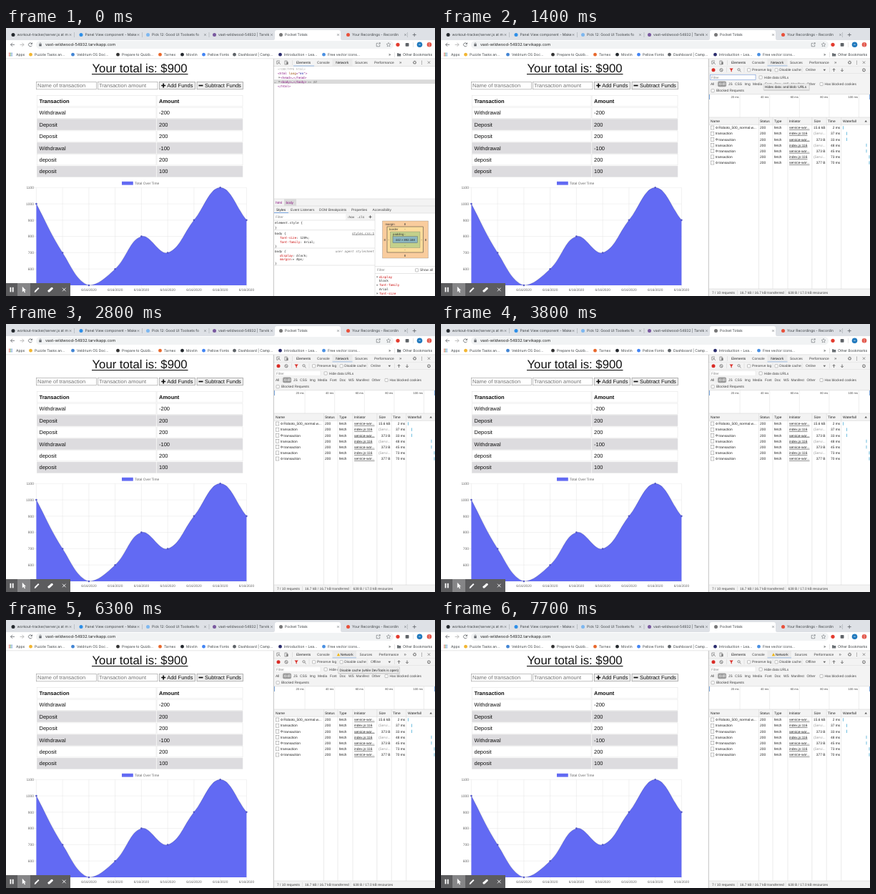
Write an HTML page that moves like this. It is 600 by 375 pixels and loops after 8 s.

```html
<!DOCTYPE html>
<html lang="en">
<head>
<meta charset="utf-8">
<title>Savings page with developer tools</title>
<style>
html, body { margin: 0; width: 100%; height: 100%; overflow: hidden; background: #fff; }
svg { display: block; width: 100%; height: 100%; }
text { font-family: "Liberation Sans", Arial, sans-serif; text-rendering: geometricPrecision; white-space: pre; }
.ui { font-family: Inter, Roboto, sans-serif; }
.mono { font-family: "DejaVu Sans Mono", monospace; }
.link { text-decoration: underline .35px #777; }
</style>
</head>
<body>
<svg id="stage" viewBox="0 0 600 375"></svg>
<script>
const LOOP = 8000;
const escapeText = s => s.replace(/&/g, '&amp;').replace(/</g, '&lt;');
const rect = (x, y, w, h, fill, extra = '') =>
  `<rect x="${x}" y="${y}" width="${w}" height="${h}" fill="${fill}" ${extra}/>`;
const line = (x1, y1, x2, y2, color = '#ccc', width = .5) =>
  `<path d="M${x1} ${y1}L${x2} ${y2}" stroke="${color}" stroke-width="${width}"/>`;
const path = (d, color = '#5f6368', width = .8, fill = 'none') =>
  `<path d="${d}" stroke="${color}" stroke-width="${width}" fill="${fill}"/>`;
const dot = (x, y, r, fill, extra = '') => `<circle cx="${x}" cy="${y}" r="${r}" fill="${fill}" ${extra}/>`;
// Text is placed by its vertical centre.
const text = (x, y, s, size = 4.85, fill = '#444', extra = '') =>
  `<text x="${x}" y="${y + size * .35}" font-size="${size}" fill="${fill}" ${extra}>${escapeText(s)}</text>`;
const ui = (x, y, s, size = 5, fill = '#3c4043') => text(x, y, s, size, fill, 'class="ui"');
const mono = (x, y, s, fill = '#222', extra = '') => text(x, y, s, 4.3, fill, 'class="mono" ' + extra);
const group = (id, body) => `<g id="${id}">${body}</g>`;
const cross = (x, y, r = 1.5, color = '#5f6368', width = .6) =>
  path(`M${x - r} ${y - r}l${2 * r} ${2 * r}m0 ${-2 * r}l${-2 * r} ${2 * r}`, color, width);
const gear = (x, y) => dot(x, y, 1.8, 'none', 'stroke="#666" stroke-width="1.2" stroke-dasharray="1.1 .3"');
const checkbox = (x, y) => rect(x, y - 2.1, 4.2, 4.2, '#fff', 'rx=".6" stroke="#888" stroke-width=".5"');
const END = 'text-anchor="end"', MIDDLE = 'text-anchor="middle"', BOLD = 'font-weight="bold"';

function browser() {
  const tabs = [
    [15.5, 'workout-tracker/server.js at m', '#24292e'],
    [110.5, 'Panel View component - Make', '#2d8fe8'],
    [204, 'Pick 12: Good UI Toolsets fo', '#7db7f0'],
    [297, 'vast-wildwood-54932 | Tarvik', '#79589f'],
    [390, 'Pocket Totals', '#777'],
    [484, 'Your Recordings - Recordin', '#e8503a']];
  let out = rect(0, 0, 600, 17, '#dee1e6') + path('M374 17Q376 17 376 14V6Q376 3 379 3H465Q468 3 468 6V14Q468 17 470 17Z', 'none', 0, '#fff');
  tabs.forEach(([x, label, color], i) => {
    out += `<clipPath id="tab${i}"><rect x="${x}" y="0" width="72" height="17"/></clipPath>` +
      `<g clip-path="url(#tab${i})">${ui(x, 9.5, label)}</g>` + dot(x - 5.5, 9.5, 2.5, color) + cross(x + 74.5, 9.5, 1.3);
    if (i < 3) out += line(x + 80, 6, x + 80, 13, '#9aa0a6');
  });
  out += line(561.5, 6, 561.5, 13, '#9aa0a6') + path('M568.7 9.5h5M571.2 7v5');

  out += rect(0, 17, 600, 26, '#fff') + rect(42, 18, 500, 11, '#f1f3f4', 'rx="5.5"') +
    path('M12 23.3H6.5M9 20.8L6.5 23.3L9 25.8') + path('M19.5 23.3H25M22.5 20.8L25 23.3L22.5 25.8', '#aaa') +
    path('M36 21.8A2.5 2.5 0 1 0 36.3 24.4M36.5 20.5v2h-2') +
    rect(46.3, 22.6, 3.4, 2.8, '#5f6368') + path('M47 22.8V21.8a1 1 0 0 1 2 0V22.8', '#5f6368', .6) +
    ui(55, 23.3, 'vast-wildwood-54932.tarvikapp.com', 5.6, '#222') +
    path('M520.5 21.3H518.2V25.8H522.7V23.5M521 23L523.2 20.8M521.5 20.8h1.7v1.7', '#5f6368', .6) +
    path('M535 20.4l.9 1.9 2 .2-1.5 1.4.4 2-1.8-1-1.8 1 .4-2-1.5-1.4 2-.2Z', '#5f6368', .5) +
    dot(548, 23.3, 2.6, '#e33b2e') + rect(558.7, 20.9, 4.8, 4.8, '#5f6368', 'rx=".8"') + line(569.5, 20, 569.5, 27) +
    dot(578.5, 23.3, 3.8, '#2079bd') + text(578.5, 23.3, 'av', 3, '#fff', MIDDLE) +
    dot(592, 23.3, 3.3, '#e2584c') + [21.6, 23.3, 25].map(y => dot(592, y, .5, '#fff')).join('');

  for (let i = 0; i < 9; i++) out += rect(4 + i % 3 * 1.8, 34.6 + (i / 3 | 0) * 1.8, 1.2, 1.2, ['#e0574a', '#5b9c63', '#4b83d8'][i % 3]);
  out += ui(14, 37.2, 'Apps');
  [[40, 'Puzzle Tasks an...', '#f2b632'], [99, 'Veldrium OS Doc...', '#4285d4'], [162, 'Prepare to Quizb...', '#333'],
   [221, 'Tarnex', '#e8682c'], [252, 'Movlin', '#24292e'], [282, 'Pellow Fonts', '#4285f4'],
   [325, 'Dashboard | Camp...', '#5f6368'], [389, 'Introduction - Lea...', '#2b2d6e'], [450, 'Free vector icons...', '#4a90e2']]
    .forEach(([x, label, color]) => out += dot(x - 5.5, 37.2, 2.4, color) + ui(x, 37.2, label));
  return out + ui(535, 37, '»', 5.5) + line(543.5, 34, 543.5, 41) +
    path('M547 35.3h2l.7.8h2.6v3.4H547Z', 'none', 0, '#6b7075') + ui(555, 37.2, 'Other Bookmarks') + line(0, 42.8, 600, 42.8);
}

function page() {
  const box = (x, w, fill, stroke) => rect(x, 75.5, w, 10.3, fill, `stroke="${stroke}" stroke-width=".6"`);
  let out = text(187, 56, 'Your total is: $900', 16.7, '#111', MIDDLE) + rect(120, 64, 134.5, 1.1, '#111') +
    box(42.5, 84, '#fff', '#999') + text(44, 80.8, 'Name of transaction', 7.5, '#757575') +
    box(128.5, 83.5, '#fff', '#999') + text(130, 80.8, 'Transaction amount', 7.5, '#757575') +
    box(214.5, 50, '#efefef', '#888') + path('M217.2 80.5h6M220.2 77.5v6', '#111', 1.7) + text(225.2, 80.8, 'Add Funds', 7.5, '#111') +
    box(267, 64.5, '#efefef', '#888') + path('M269.5 80.5h6', '#111', 1.7) + text(278, 80.8, 'Subtract Funds', 7.5, '#111');
  [['Transaction', 'Amount'], ['Withdrawal', '-200'], ['Deposit', '200'], ['Deposit', '200'],
   ['Withdrawal', '-100'], ['deposit', '200'], ['deposit', '100']].forEach((cells, i) => {
    const y = 102.3 + i * 16.4, shaded = i && i % 2 == 0;
    cells.forEach((cell, j) => out += rect(j ? 211 : 43.2, y - 7.6, j ? 120 : 166.8, 15.2, shaded ? '#dddcdf' : '#fff',
      'stroke="#e0e0e0" stroke-width=".5"') + text(j ? 214 : 46.5, y, cell, 7.5, '#111', i ? '' : BOLD));
  });
  return out + chart();
}

function chart() {
  const left = 42.4, right = 336.4, top = 223.3, bottom = 360, step = (right - left) / 8;
  const toY = v => bottom - (v - 500) / 600 * (bottom - top);
  const clampY = y => Math.max(top, Math.min(bottom, y));
  const points = [1000, 700, 500, 600, 800, 700, 900, 1100, 900].map((v, i) => [left + i * step, toY(v)]);
  const controls = points.map((p, i) => {
    const a = points[i - 1] || p, b = points[i + 1] || p;
    const before = Math.hypot(p[0] - a[0], p[1] - a[1]), after = Math.hypot(b[0] - p[0], b[1] - p[1]);
    const at = k => [p[0] + k * (b[0] - a[0]), clampY(p[1] + k * (b[1] - a[1]))];
    return { into: at(-.4 * before / (before + after)), out: at(.4 * after / (before + after)) };
  });
  const curve = 'M' + points[0] + points.slice(1).map((p, i) => `C${controls[i].out} ${controls[i + 1].into} ${p}`).join('');
  let out = rect(162, 214.8, 15.8, 4.8, '#626af3') + text(180, 217.3, 'Total Over Time', 4.9, '#666');
  for (let v = 500; v <= 1100; v += 100) {
    out += line(left - 4, toY(v), right, toY(v), '#e4e4e4');
    if (v > 500) out += text(39, toY(v), String(v), 4.9, '#666', END);
  }
  points.forEach(([x], i) => out += line(x, top, x, bottom + 4, '#e4e4e4') +
    (i > 1 ? text(x, 366.3, '6/16/2020', 4.8, '#666', MIDDLE) : ''));
  return out + path(`${curve}L${right} ${bottom}H${left}Z`, 'none', 0, '#626af3') + path(curve, 'rgba(0,0,0,.1)', 1.2) +
    points.map(([x, y]) => dot(x, y, 1.3, '#5257c8')).join('');
}

function recorder() {
  return rect(0, 357, 90, 18, '#5c5c5e') + rect(16, 357, 18, 18, '#858587') +
    rect(5.5, 362.8, 1.8, 6.6, '#fff') + rect(8.8, 362.8, 1.8, 6.6, '#fff') +
    path('M22.8 361.7V369.4L24.6 367.7L25.9 370.4L27.1 369.8L25.8 367.2H28Z', 'none', 0, '#fff') +
    path('M40.7 368.8L45.8 363.6', '#fff', 2) + path('M39.6 370l.5-2 1.5 1.5Z', 'none', 0, '#fff') +
    path('M58.2 367.6L63.3 363.2Q64 362.6 65 363L66 364.7L61 369.4H59Z', 'none', 0, '#fff') + cross(81.3, 366, 2.3, '#fff', .9);
}

function toolsFrame() {
  return rect(374, 43, 226, 332, '#fff') + rect(374, 43, 226, 10.5, '#f3f3f3') +
    path('M383 46H378.8V50.3H380.5M381 48l3 3M381 50v-2h2', '#666', .6) +
    rect(390, 46, 3, 5, 'none', 'stroke="#666" stroke-width=".6"') + rect(392.3, 47.4, 2.3, 3.6, '#777') +
    line(400.5, 45, 400.5, 52) +
    group('elementsTab', rect(402, 52.7, 29, .8, '#5b97e5')) +
    rect(456.5, 43.3, 28, 9.8, '#eaeaea') + group('warnTab', rect(484, 43.3, 6, 9.8, '#eaeaea') +
      path('M465 46.2L467.2 50.2H462.8Z', 'none', 0, '#f0b400')) +
    group('networkLine', rect(456.5, 52.7, 28, .8, '#5b97e5')) +
    text(406, 48.3, 'Elements', 4.85, '#222') + text(435, 48.3, 'Console') +
    group('laterTabs', text(461.3, 48.3, 'Network', 4.85, '#222') + text(488, 48.3, 'Sources') + text(515, 48.3, 'Performance') + text(550, 48, '»', 6)) +
    gear(571.5, 48.2) + [46.2, 48.2, 50.2].map(y => dot(581.5, y, .55, '#666')).join('') + cross(591.5, 48.2, 1.7, '#555') +
    line(374, 53.5, 600, 53.5) + line(374.3, 43, 374.3, 375, '#aaa', .7);
}

function elementsPanel() {
  const tag = '#881280', red = '#c80000';
  const arrow = (x, y, c = '#777') => path(`M${x} ${y - 1.3}v2.6l2-1.3Z`, 'none', 0, c);
  let out = rect(375, 72.2, 225, 5.8, '#dadada') + mono(380, 57.8, '<!DOCTYPE html>', '#aaa') +
    `<text class="mono" x="380" y="65" font-size="4.3" fill="${tag}">&lt;html <tspan fill="#994500">lang</tspan>="<tspan fill="#1a1aa6">en</tspan>"&gt;</text>` +
    arrow(381.5, 69.3) + mono(384, 69.3, '<head>…</head>', tag) + mono(375, 75, '…', '#777') + arrow(381.5, 75) +
    mono(384, 75, '<body>…</body>', tag) + mono(422, 75, '== $0', '#777', 'font-style="italic"') + mono(380, 81, '</html>', tag);
  out += rect(375, 239, 225, 20, '#f3f3f3') + line(375, 239, 600, 239) + line(375, 249, 600, 249) +
    text(377, 244, 'html', 4.85, tag) + rect(389, 239.3, 17, 9.5, '#dadada') + text(391.5, 244, 'body', 4.85, tag) +
    text(378, 254, 'Styles', 4.85, '#222') + text(398, 254, 'Event Listeners') + text(438, 254, 'DOM Breakpoints') +
    text(483, 254, 'Properties') + text(512.5, 254, 'Accessibility') + rect(375, 258, 20, 1, '#5b97e5') + line(375, 259, 600, 259) +
    text(377, 264.5, 'Filter', 4.85, '#888') + rect(475, 259.5, 41, 9.3, '#f3f3f3') + mono(477, 264.3, ':hov', '#333') +
    mono(491, 264.3, '.cls', '#333') + path('M507.5 264.3h4M509.5 262.3v4', '#444') + line(375, 269, 516, 269) + line(516, 259, 516, 375);
  out += mono(376, 272.5, 'element.style {') + mono(376, 279, '}') + line(375, 282.7, 516, 282.7) +
    mono(376, 287, 'body {') + text(515, 287, 'styles.css:1', 4.3, '#555', END + ' class="mono link"') + mono(376, 305, '}') +
    line(375, 308, 516, 308) + mono(376, 312.3, 'body {', '#222', 'font-style="italic"') +
    mono(515, 312.3, 'user agent stylesheet', '#777', END + ' font-style="italic"') + mono(376, 329, '}') + line(375, 332, 516, 332);
  [[293, 'font-size', ' 120%;'], [299, 'font-family', ' Arial;'], [318, 'display', ' block;'], [323.7, 'margin', '▸ 8px;']]
    .forEach(([y, key, value]) => out += `<text class="mono" x="383" y="${y + 1.5}" font-size="4.3" fill="#222" ${y > 310 ? 'font-style="italic"' : ''}><tspan fill="${red}">${key}</tspan>:${value}</text>`);
  out += rect(526.5, 270, 64, 52, '#f9cc9d', 'stroke="#555" stroke-width=".5" stroke-dasharray="1"') +
    rect(533, 278, 50.5, 36, '#fddd9b', 'stroke="#333" stroke-width=".5"') +
    rect(537.5, 285, 41.5, 22.5, '#c3d08b', 'stroke="#555" stroke-width=".5" stroke-dasharray="1"') +
    rect(541, 291.8, 34.5, 9, '#8cb6c0', 'stroke="#555" stroke-width=".4"') +
    text(558.3, 296.3, '442 × 892.188', 4.2, '#222', MIDDLE) + text(530.5, 274, 'margin', 4.3, '#333') +
    text(536, 281.7, 'border', 4.3, '#333') + text(541, 288.5, 'padding', 4.3, '#333') +
    [[529.8, 296], [587, 296], [558, 274], [558, 318]].map(([x, y]) => text(x, y, '8', 4.3, '#333', MIDDLE)).join('') +
    [[535.3, 296], [581.3, 296], [558, 281.7], [558, 288.5], [558, 304], [558, 310.5]].map(([x, y]) => text(x, y, '-', 4.3, '#333', MIDDLE)).join('');
  out += line(516, 333.5, 600, 333.5) + text(519, 338.8, 'Filter', 4.85, '#888') + checkbox(572.5, 338.8) + text(579, 338.8, 'Show all') + line(516, 343.5, 600, 343.5);
  [['display', 'block'], ['font-family', 'Arial'], ['font-size', '']].forEach(([key, value], i) => {
    const y = 348.2 + i * 11.6;
    out += arrow(518.5, y) + mono(522, y, key, red) + mono(522, y + 5.4, value);
  });
  return out;
}

function networkPanel() {
  const bottom = 365;
  let out = rect(375, 53.7, 225, 72, '#f3f3f3') + line(375, 63.5, 600, 63.5, '#ddd') +
    dot(381, 58.8, 2.5, '#d92b25') + dot(392, 58.8, 2.1, 'none', 'stroke="#666" stroke-width=".8"') + line(390.6, 57.4, 393.4, 60.2, '#666', .7) +
    line(399.5, 55, 399.5, 62) + path('M403.5 56.5h5.2l-2 2.5v2.6l-1.2-.8V59Z', 'none', 0, '#d92b25') +
    dot(416.5, 58.2, 1.6, 'none', 'stroke="#666" stroke-width=".7"') + line(417.7, 59.4, 419.5, 61.2, '#666', .8) + line(424, 55, 424, 62) +
    checkbox(428.5, 58.8) + text(435, 58.8, 'Preserve log') + line(464, 55, 464, 62) + checkbox(467, 58.8) + text(473.3, 58.8, 'Disable cache') + line(505, 55, 505, 62) +
    group('online', text(510, 58.8, 'Online')) + group('offline', text(510, 58.8, 'Offline')) +
    path('M534.5 57.8h3.6l-1.8 2.5Z', 'none', 0, '#666') + line(543.5, 55, 543.5, 62) +
    path('M549.5 61V57M547.7 58.7l1.8-1.9 1.8 1.9', '#666', .9) + path('M561 56.6V60.6M559.2 58.9l1.8 1.9 1.8-1.9', '#666', .9) +
    gear(591.5, 58.8) +
    rect(376.5, 65.3, 63.5, 7.4, '#fff', 'stroke="#ddd" stroke-width=".4"') +
    group('focus', rect(376.5, 65.5, 63.5, 7, '#fff', 'stroke="#7398d8" stroke-width=".6"')) +
    text(378, 69.2, 'Filter', 4.85, '#888') + checkbox(445, 69) + text(452, 69, 'Hide data URLs') +
    rect(387, 74.6, 12, 7.6, '#9b9b9b', 'rx="2"') + text(388, 78.5, 'XHR', 4.85, '#fff');
  [[377, 'All'], [402, 'JS'], [411, 'CSS'], [424.5, 'Img'], [436, 'Media'], [453, 'Font'], [466.5, 'Doc'], [479, 'WS'],
   [489.5, 'Manifest'], [511.5, 'Other'], [536.5, 'Has blocked cookies']].forEach(([x, label]) => out += text(x, 78.5, label));
  out += line(385, 75.5, 385, 81.5) + checkbox(530, 78.5) + checkbox(378, 87.7) + text(385, 87.7, 'Blocked Requests') +
    rect(375, 92.7, 225, 32.3, '#fff') + line(375, 92.7, 600, 92.7);
  for (let i = 1; i <= 5; i++) {
    const x = 376.5 + i * 41.6;
    out += line(x, 93, x, 125, '#ddd') + text(x - 1.5, 97, i * 20 + ' ms', 4.1, '#444', END);
  }
  out += rect(375, 93, 1, 7, '#7aa7dd') + rect(599, 93, 1, 7, '#7aa7dd') + rect(375, 125, 225, 10.3, '#f3f3f3') + line(375, 125, 600, 125) + line(375, 135.3, 600, 135.3);
  [444.5, 464, 485, 518.8, 539.2, 559.7].forEach(x => out += line(x, 125, x, bottom, '#d4d4d4'));
  [[377, 'Name'], [446, 'Status'], [466, 'Type'], [487, 'Initiator'], [521.5, 'Size'], [541, 'Time'], [562, 'Waterfall']]
    .forEach(([x, label]) => out += text(x, 130.3, label, 4.85, '#222'));
  out += path('M592.5 131.5h3.4l-1.7-2.6Z', 'none', 0, '#555');
  [['Roboto_500_normal.w...', '15.6 kB', 2, 562.5], ['transaction', '', 37, 567.5], ['transaction', '373 B', 33, 567.5],
   ['transaction', '', 48, 595], ['transaction', '373 B', 45, 595], ['transaction', '', 73, 599], ['transaction', '377 B', 70, 599]]
    .forEach(([name, size, ms, barX], i) => {
      const y = 139.5 + i * 8.17;
      out += rect(377.5, y - 2.5, 4.3, 5, '#fff', 'stroke="#888" stroke-width=".5"') +
        (size ? dot(385.6, y, 1.1, 'none', 'stroke="#444" stroke-width=".8"') : '') + text(size ? 388.3 : 384, y, name, 4.85, '#222') +
        text(446, y, '200', 4.85, '#222') + text(466, y, 'fetch', 4.85, '#222') +
        text(487, y, size ? 'service-wor...' : 'index.js:116', 4.85, '#222', 'class="link"') +
        (size ? text(537.5, y, size, 4.85, '#222', END) : text(521, y, '(Servi...', 4.85, '#999')) +
        text(558.3, y, ms + ' ms', 4.85, '#222', END) + rect(barX - .4, y - 2.2, .8, 4.4, '#4fb0d8');
    });
  return out + rect(375, bottom, 225, 10, '#f3f3f3') + line(375, bottom, 600, bottom) + text(379, 370, '7 / 10 requests') + line(414.5, 367, 414.5, 373) +
    text(418, 370, '16.7 kB / 16.7 kB transferred') + line(482, 367, 482, 373) + text(485.5, 370, '638 B / 17.0 kB resources');
}

const tooltip = (id, x, y, w, label) => group(id, rect(x + .5, y + 1, w, 9, 'rgba(0,0,0,.12)') +
  rect(x, y, w, 8.7, '#ececec', 'stroke="#c4c4c4" stroke-width=".5"') + text(x + 2, y + 4.4, label, 4.75, '#222'));

document.getElementById('stage').innerHTML = rect(0, 0, 600, 375, '#fff') + page() + toolsFrame() +
  group('elements', elementsPanel()) + group('network', networkPanel()) +
  tooltip('dataTip', 451, 78, 64, 'Hides data: and blob: URLs') +
  tooltip('cacheTip', 464.5, 65.8, 86, 'Disable cache (while DevTools is open)') + browser() + recorder();

// Each part is visible from its start to its end, in ms.
const schedule = {
  elements: [0, 300], elementsTab: [0, 300], network: [300, LOOP], networkLine: [300, LOOP], focus: [300, 2200],
  dataTip: [1200, 1800], online: [0, 5300], offline: [5300, LOOP], warnTab: [5300, LOOP], cacheTip: [6200, 7000]
};
const parts = Object.entries(schedule).map(([id, span]) => [document.getElementById(id), span]);
const laterTabs = document.getElementById('laterTabs'), networkLine = document.getElementById('networkLine').firstChild;

function draw(now) {
  const t = now % LOOP, warned = t >= 5300;
  for (const [part, [start, end]] of parts) part.style.display = t >= start && t < end ? '' : 'none';
  laterTabs.setAttribute('transform', `translate(${warned ? 6.5 : 0})`);
  networkLine.setAttribute('width', warned ? 33.5 : 28);
  requestAnimationFrame(draw);
}
draw(performance.now());
</script>
</body>
</html>
```
